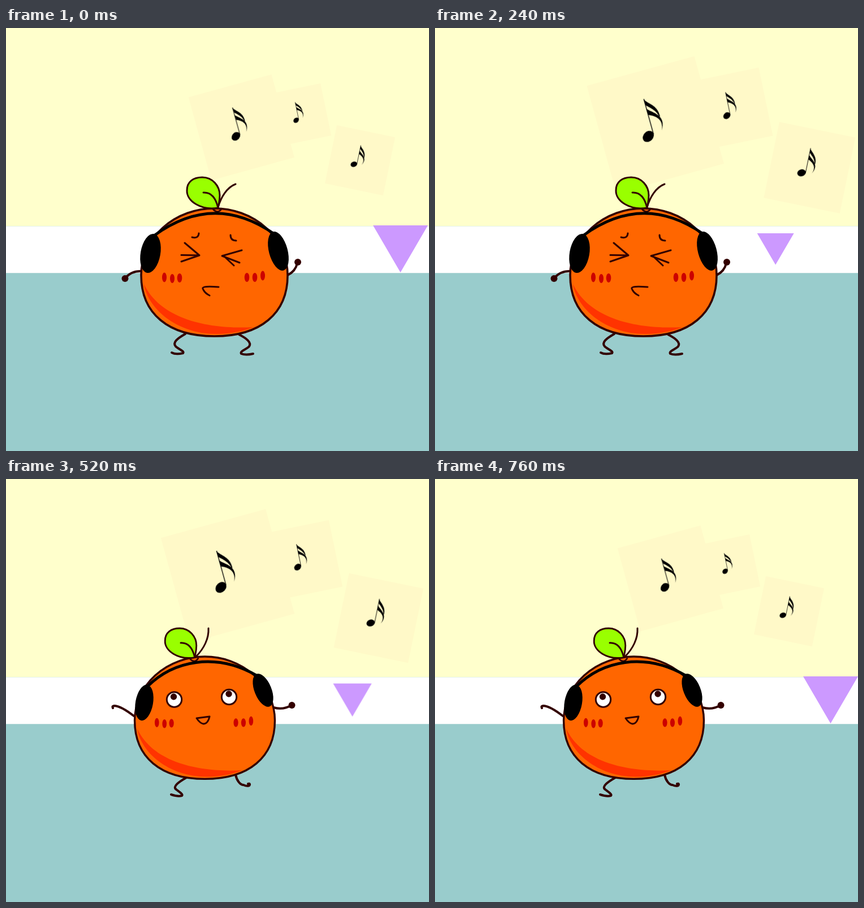
Write an HTML page that moves like this. It is 748 by 748 pixels and loops after 0.8 s.

```html
<!DOCTYPE html>
<html lang="en">
<head>
<meta charset="utf-8">
<title>Dancing orange</title>
<style>
html, body { margin: 0; width: 100%; height: 100%; overflow: hidden; background: #99cccc; }
svg { display: block; width: 748px; height: 748px; }
.swing { animation: swing .8s infinite; }
.squint { animation: squint .8s step-end infinite; }
.smile { animation: smile .8s step-end infinite; }
/* nine steps out, ten steps back, one step held */
@keyframes swing {
  0% { transform: var(--a); animation-timing-function: steps(9); }
  45% { transform: var(--b); animation-timing-function: steps(10); }
  95%, 100% { transform: var(--c, var(--a)); }
}
@keyframes squint { 0% { visibility: visible; } 45%, 100% { visibility: hidden; } }
@keyframes smile { 0% { visibility: hidden; } 45%, 100% { visibility: visible; } }
.n1 { --a: translate(416px, 175.5px) rotate(-15.4deg) scale(1.515); --b: translate(376px, 168.5px) rotate(-15.4deg) scale(2.19); }
.n2 { --a: translate(519.5px, 153.5px) rotate(-11.7deg) scale(.94); --b: translate(527px, 137px) rotate(-11.7deg) scale(1.37); }
.n3 { --a: translate(626px, 234px) rotate(11.6deg) scale(1.05); --b: translate(680.5px, 253.5px) rotate(11.6deg) scale(1.53); }
.tri { --a: translate(697.5px, 349px) scale(1.98); --b: translate(554.5px, 370px) scale(1); --c: translate(699.5px, 349px) scale(1.98); }
.line { fill: none; stroke: #330000; stroke-width: 3; stroke-linecap: round; stroke-linejoin: round; }
.limb { stroke-width: 4; }
.dot { fill: #330000; }
.band { fill: none; stroke: #000; stroke-width: 5; }
</style>
</head>
<body>
<svg viewBox="0 0 748 748">
  <defs>
    <g id="note">
      <rect x="-50" y="-50" width="100" height="100" fill="#fff9c8"/>
      <ellipse cx="-8.8" cy="8.6" rx="5.6" ry="4.4" transform="rotate(-30 -8.8 8.6)"/>
      <path d="M-4.1-25H-3.4V8H-4.1Z"/>
      <path d="M-4-25C-2-20 6.8-17 6.2-6L5.4-6C4.5-12 0-15.500-3.6-19Z"/>
      <path d="M-4-16C0-11 12.5-6 4.3 6.7C8.5-2 3.5-7-3.6-10Z"/>
    </g>
    <g id="body">
      <path d="M239 437A129.5 118 0 0 1 498 437C498 505 450 545 368.500 545C287 545 239 505 239 437Z" fill="#ff6600" stroke="#330000" stroke-width="3.6"/>
      <path d="M244 453C250 494 300 541 372 541C400 541 422 535 437 529C365 533 275 518 244 453Z" fill="#ff3300"/>
      <g fill="#cc0000">
        <ellipse cx="280" cy="441" rx="4" ry="8.5"/>
        <ellipse cx="294" cy="443" rx="4" ry="8"/>
        <ellipse cx="307" cy="442" rx="4.3" ry="8"/>
        <ellipse cx="426" cy="441" rx="4.3" ry="8"/>
        <ellipse cx="440" cy="441" rx="4.3" ry="8"/>
        <ellipse cx="454" cy="438" rx="4" ry="8.5"/>
      </g>
    </g>
    <g id="leaf" class="line">
      <path d="M365 319Q374 330 381 320"/>
      <path d="M375 318C345 323 319 306 320 287C320 272 331 264 347 264C365 264 378 279 378 296C378 306 376 312 375 318Z" fill="#99ff00"/>
      <path d="M349 291C365 290 372 305 375 318"/>
    </g>
  </defs>

  <rect width="748" height="350.500" fill="#ffffcc"/>
  <rect y="350.500" width="748" height="83" fill="#fff"/>
  <rect y="433.500" width="748" height="314.500" fill="#99cccc"/>

  <use href="#note" class="swing n1"/>
  <use href="#note" class="swing n2"/>
  <use href="#note" class="swing n3"/>
  <path class="swing tri" d="M-24.5 0H24.5L0 42Z" fill="#cc99ff"/>

  <g class="squint">
    <g class="line limb">
      <path d="M240 430Q222 429 211 442"/>
      <path d="M498 437Q512 430 515 416"/>
      <path d="M317 541C303 549 294 556 300 563C305 568 316 571 313 575Q300 578 293 574"/>
      <path d="M412 542C424 548 435 556 430 563C426 568 413 571 416 576Q424 579 437 576"/>
    </g>
    <circle class="dot" cx="210.500" cy="443" r="6"/>
    <circle class="dot" cx="516" cy="414" r="6"/>
    <use href="#body"/>
    <use href="#leaf"/>
    <path class="line" d="M375 317C380 300 390 282 406 276"/>
    <path class="band" d="M262 367Q368 290 474 364"/>
    <ellipse cx="255.500" cy="398.500" rx="17.500" ry="35" transform="rotate(10 255.500 398.500)"/>
    <ellipse cx="481.500" cy="394.500" rx="16.500" ry="35.500" transform="rotate(-15 481.500 394.500)"/>
    <g class="line">
      <path d="M329 370Q340 373 341 363"/>
      <path d="M397 366Q397 376 407 376"/>
      <path d="M316 380L342 402L310 413M310 401.500L342 402"/>
      <path d="M417 393L382 403L413 415M386 404L403 420"/>
      <path d="M376 458C350 456 345 458 349 463Q352 469 360 473"/>
    </g>
  </g>

  <g class="smile">
    <g class="line limb">
      <path d="M226 419Q204 402 192 401Q187 401 189 405"/>
      <path d="M473 404Q490 409 505 400"/>
      <path d="M319 528C305 536 294 544 301 549C306 553 314 558 311 560Q304 562 292 558"/>
      <path d="M406 523C408 533 414 541 420 541C426 544 432 543 431 540Q431 538 428 539"/>
    </g>
    <circle class="dot" cx="505.500" cy="400" r="6"/>
    <use href="#body" transform="translate(-1.150 8.800) scale(.957)"/>
    <use href="#leaf" transform="translate(-25 11.300) scale(.957)"/>
    <path class="line" d="M336 314C350 300 359 282 358 264"/>
    <path class="band" d="M250 367C295 322 370 305 444 348"/>
    <ellipse cx="244.500" cy="395.500" rx="15.500" ry="32" transform="rotate(10 244.500 395.500)"/>
    <ellipse cx="454.500" cy="373.500" rx="15" ry="31" transform="rotate(-22 454.500 373.500)"/>
    <g class="line">
      <circle cx="297.500" cy="390" r="13.200" fill="#fff"/>
      <circle cx="394.500" cy="385.500" r="13.200" fill="#fff"/>
      <path d="M337 423L360 420Q357 433 349 433Q343 432 337 423Z"/>
    </g>
    <circle class="dot" cx="296.500" cy="385" r="5.700"/>
    <circle class="dot" cx="394" cy="380" r="5.700"/>
  </g>
</svg>
</body>
</html>
```
